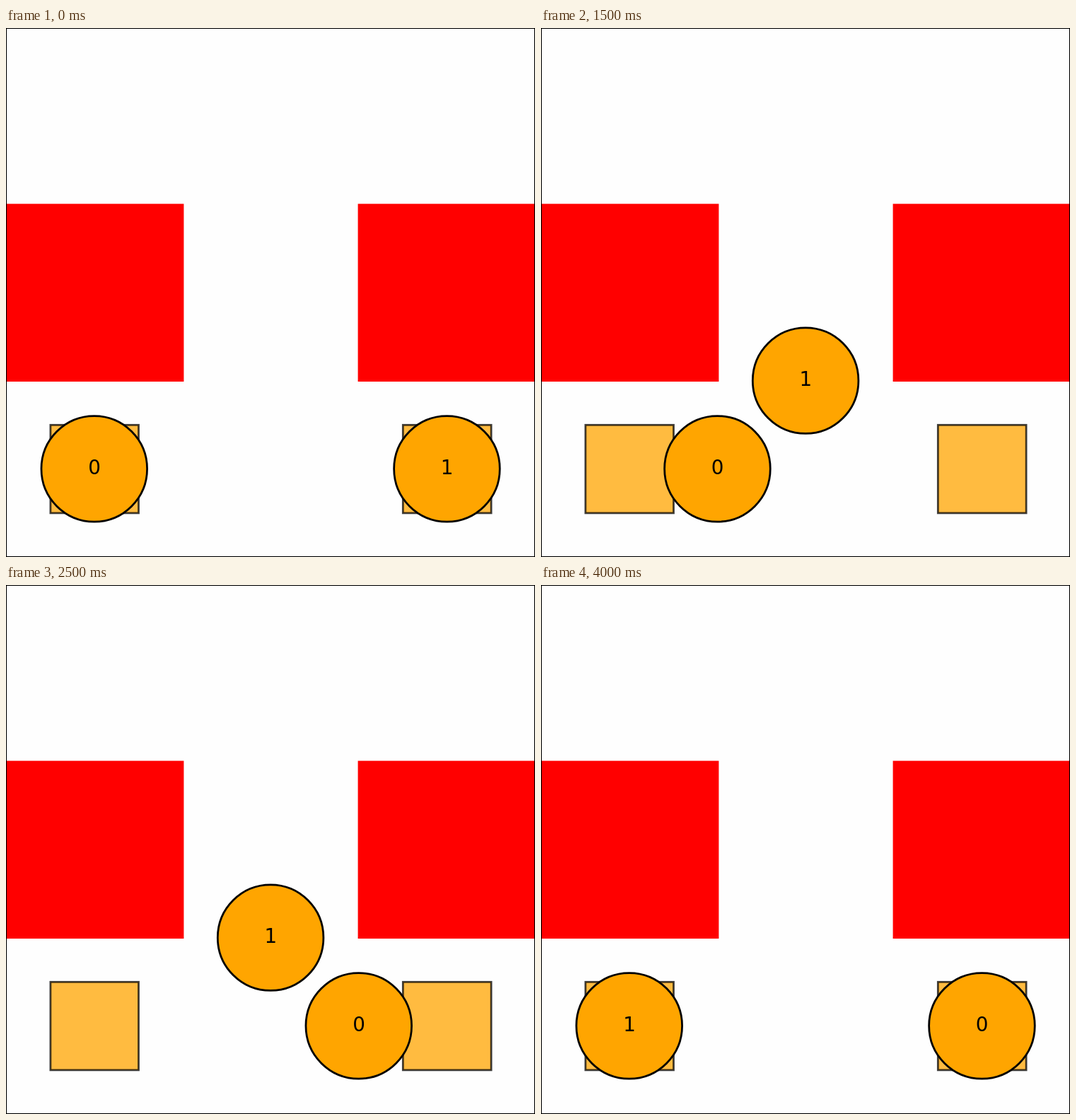
These frames come from a looping animation (748 by 748 pixels, 5 s). An HTML page:

```html
<!DOCTYPE html>
<html lang="en">
<head>
<meta charset="utf-8">
<title>Swapping agents</title>
<style>
  html, body { margin: 0; width: 100%; height: 100%; overflow: hidden; background: #fefefe; }
  svg { display: block; width: 100%; height: 100%; }
  .wall { fill: #f00; }
  .goal { fill: #ffa500; stroke: #000; stroke-width: 2.78; opacity: 1; fill-opacity: .75; stroke-opacity: .75; }
  .agent circle { fill: #ffa500; stroke: #000; stroke-width: 2.78; }
  .agent text { font: 27.78px "DejaVu Sans", sans-serif; text-anchor: middle; }
  .frame { fill: none; stroke: #000; stroke-width: 2.2; }
</style>
</head>
<body>
<svg viewBox="0 0 748 748">
  <rect class="wall" x="0" y="248.6" width="251.4" height="251.4"/>
  <rect class="wall" x="497.6" y="248.6" width="250.4" height="251.4"/>
  <rect class="goal" x="62.9" y="561.3" width="124.6" height="124.6"/>
  <rect class="goal" x="561.3" y="561.3" width="124.8" height="124.6"/>
  <g class="agent"><circle r="74.8"/><text>0</text></g>
  <g class="agent"><circle r="74.8"/><text>1</text></g>
  <rect class="frame" x="0" y="0" width="748" height="748"/>
</svg>
<script>
  const CELL = 748 / 3, TICK = 100, LOOP = 5000, STEPS = 10;

  // Grid cells [column, row] visited, one move per ten ticks
  const routes = [
    [[0, 2], [0, 2], [1, 2], [2, 2], [2, 2]],
    [[2, 2], [1, 2], [1, 1], [1, 2], [0, 2]]
  ];
  const agents = [...document.querySelectorAll('.agent')].map((g, i) => ({
    disc: g.querySelector('circle'),
    label: g.querySelector('text'),
    route: routes[i]
  }));

  const center = cell => (cell + 0.5) * CELL;

  function place(route, tick) {
    const leg = Math.min(Math.floor(tick / STEPS), route.length - 2);
    const part = Math.min(tick / STEPS - leg, 1);
    return [0, 1].map(k => {
      const from = route[leg][k], to = route[leg + 1][k];
      return center(from + (to - from) * part);
    });
  }

  function draw(time) {
    const tick = Math.floor((time % LOOP) / TICK);
    for (const { disc, label, route } of agents) {
      const [x, y] = place(route, tick);
      disc.setAttribute('cx', x + 0.1);
      disc.setAttribute('cy', y);
      label.setAttribute('x', x + 0.3);
      label.setAttribute('y', Math.round(y + 7.8));
    }
  }

  const start = performance.now();
  function loop() {
    draw(performance.now() - start);
    requestAnimationFrame(loop);
  }
  draw(0);
  requestAnimationFrame(loop);
</script>
</body>
</html>
```
